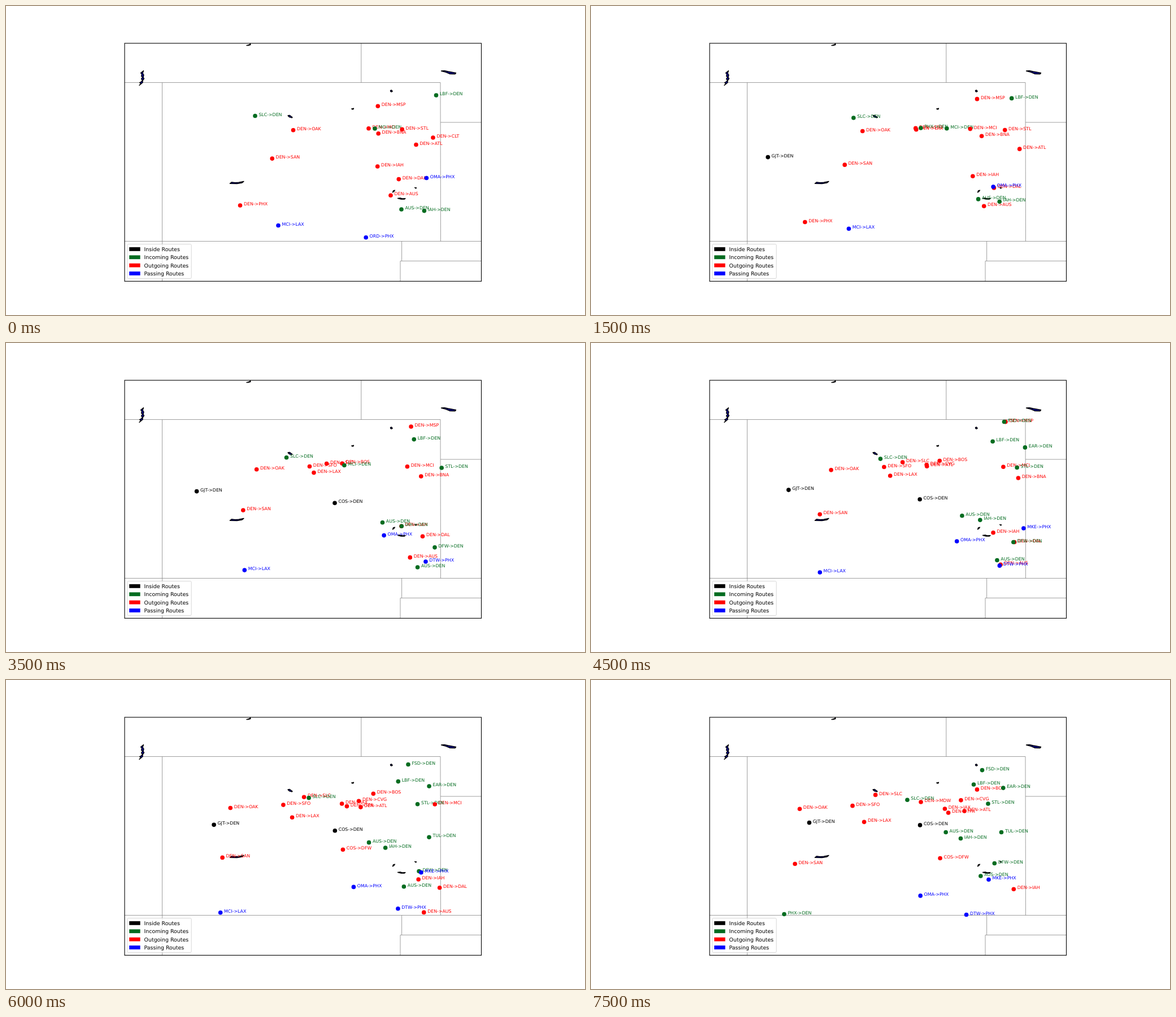
Recreate the animation shown at these times as an HTML page. Size 1025 px wide and 547 px high, loop 8000 ms.

```html
<!DOCTYPE html>
<html lang="en">
<head>
<meta charset="utf-8">
<title>Routes</title>
<style>
  html, body { margin: 0; width: 100%; height: 100%; overflow: hidden; background: #fff; }
  svg { display: block; width: 100%; height: 100%; }
  text { font-family: "DejaVu Sans", sans-serif; text-rendering: geometricPrecision; white-space: pre; }
  #labels { font-size: 7.85px; }
  #legend text { font-size: 9.42px; }
  .borders { fill: none; stroke: #808080; stroke-width: .75; }
  .lakes { fill: #00008b; stroke: #000; stroke-width: 1.3; stroke-linejoin: round; }
</style>
</head>
<body>
<svg viewBox="0 0 1025 547">
  <path class="borders" d="M210 135.5H769L769.5 416.5M276.5 135.5V487M628.8 66V135.5M769.2 206H841.5M210 416.5H841.5M700.6 416.5V451.4M841.5 451.4H698V487"/>
  <g class="lakes">
    <path d="M243.5 114.5L238.5 118.5 240.5 121.500 239.500 124 241.500 126 239.500 129 241.500 131.500 239.500 134 236.500 135.500 238.500 137.500 236 140.500 239 138 242 135.500 242 132 244.500 128.500 243 126 244 122 242 119Z"/>
    <path d="M770.5 115L776 114.300 783 116 791 117.300 796.500 118.500 795 120.500 786 120.300 779 117.300Z"/>
    <path d="M425.8 69.900L429 69.900 433 68.700 432.500 66.500 431 68.300Z"/>
    <path d="M499 194L502 193.300 507 197 506 198 501.500 196.700Z"/>
    <path d="M680.500 149.300L683 148.800 682.700 150 684.300 150.500 683 152 680.800 151.500Z"/>
    <path d="M611.800 182L615.500 181.200 615 182.700 613 183Z"/>
    <path d="M396.300 314.300L399.500 311.800 406 312.700 412 312.200 421 310.400 418 313 409 314.500Z"/>
    <path d="M684.500 330L685.500 327 688.500 326.200 686.800 328.500Z"/>
    <path d="M723.500 321.300L726.700 321.800 725.500 322.900Z"/>
    <path d="M693.500 340.500L698 339.800 702 341 707 340.700 705.500 342 699.500 342Z"/>
  </g>
  <g id="labels"></g>
  <g id="dots"></g>
  <rect x="210" y="66" width="631.5" height="421.300" fill="none" stroke="#000" stroke-width="1.1"/>
  <g id="legend">
    <rect x="214.700" y="421.700" width="113.500" height="60.700" rx="2" fill="#fff" fill-opacity=".8" stroke="#ccc" stroke-width=".8"/>
  </g>
</svg>
<script>
const STEP_MS = 500, STEPS = 16, LAST = STEPS - 1;
const BLACK = '#000', GREEN = '#046c20', RED = '#f00', BLUE = '#00f';

// Each flight: route, first step, last step, x, y at the first step, dx, dy per step.
const outgoing = [
  ['DEN->OAK', 0, LAST, 508.5, 219.8, -9.27, .56],
  ['DEN->SAN', 0, LAST, 471.2, 270.1, -7.34, 3.69],
  ['DEN->PHX', 0, 6, 414.5, 353, -11.9, 9.85],
  ['DEN->MSP', 0, 9, 658.3, 177.2, 8.4, -4.18],
  ['DEN->MCI', 0, 13, 642, 216.8, 9.77, .27],
  ['DEN->BNA', 0, 10, 659.2, 225.8, 10.8, 1.46],
  ['DEN->STL', 0, 6, 701.2, 218.4, 10.5, .4],
  ['DEN->CLT', 0, 1, 756, 233, 11, 1.8],
  ['DEN->ATL', 0, 4, 726, 245.5, 10.9, 2.55],
  ['DEN->IAH', 0, LAST, 657.7, 284, 6.04, 5.75],
  ['DEN->DAL', 0, 12, 695.3, 306.6, 6.03, 5.1],
  ['DEN->AUS', 0, 12, 681, 335.2, 4.9, 6.35],
  ['DEN->SFO', 2, LAST, 584, 215.9, -9.31, .52],
  ['DEN->LAX', 2, LAST, 583.4, 216, -7.68, 2.72],
  ['DEN->SLC', 5, LAST, 583.6, 216, -8, -1.26],
  ['DEN->BOS', 6, LAST, 584, 215.7, 11.05, -2.42],
  ['DEN->ATL', 8, LAST, 583.6, 216, 11.07, 2.28],
  ['DEN->CVG', 8, LAST, 584, 216, 10.13, -.45],
  ['DEN->TPA', 10, LAST, 584, 216, 9.72, 3.8],
  ['COS->DFW', 10, LAST, 582, 290, 7.21, 5.1],
  ['DEN->JAX', 11, LAST, 584, 216, 10.6, 3],
  ['DEN->MDW', 15, LAST, 584, 216, 0, 0]
];
const incoming = [
  ['SLC->DEN', 0, LAST, 441, 194.5, 7.93, 1.18],
  ['LBF->DEN', 0, LAST, 761.5, 158, -5.6, 1.8],
  ['MCI->DEN', 0, 8, 653, 217, -7.73, -.08],
  ['AUS->DEN', 0, LAST, 700, 360, -4.79, -6.03],
  ['IAH->DEN', 0, LAST, 740.4, 362.6, -5.73, -5.47],
  ['PHX->DEN', 3, 3, 583.8, 216, 0, 0],
  ['AUS->DEN', 4, LAST, 743.1, 415.7, -4.84, -6.24],
  ['DFW->DEN', 5, LAST, 770.2, 371.2, -5.59, -4.67],
  ['STL->DEN', 7, LAST, 771.2, 221, -8.53, -.25],
  ['FSD->DEN', 8, LAST, 738, 136.2, -6.5, 3.34],
  ['EAR->DEN', 9, LAST, 768.4, 184.9, -6.44, 1.03],
  ['TUL->DEN', 10, LAST, 764, 284, -7.5, -2.9],
  ['PHX->DEN', 15, LAST, 342, 414.5, 0, 0]
];
const inside = [
  ['GJT->DEN', 3, LAST, 313.2, 267.6, 6.1, -1.25],
  ['COS->DEN', 5, LAST, 581.9, 289.9, .06, -3.3]
];
const passing = [
  ['OMA->PHX', 0, LAST, 744.4, 304.5, -10.75, 5.16],
  ['MCI->LAX', 0, 14, 482, 388.5, -8.53, 1.94],
  ['ORD->PHX', 0, 1, 637.2, 409.8, -10.3, 5],
  ['DTW->PHX', 5, LAST, 762.6, 379.9, -9.81, 3.56],
  ['MKE->PHX', 9, LAST, 765.8, 328, -10.3, 4.22]
];

const byId = id => document.getElementById(id);
function add(parent, tag, attrs, content = '') {
  const node = document.createElementNS('http://www.w3.org/2000/svg', tag);
  for (const key in attrs) node.setAttribute(key, attrs[key]);
  node.textContent = content;
  return parent.appendChild(node);
}

const flights = [[outgoing, RED], [incoming, GREEN], [inside, BLACK], [passing, BLUE]]
  .flatMap(([list, fill]) => list.map(([route, first, last, x, y, dx, dy]) => ({
    first, last, x, y, dx, dy,
    nodes: [
      add(byId('labels'), 'text', { x: 6.4, y: .1, fill }, route),
      add(byId('dots'), 'circle', { r: 3.8, fill })
    ]
  })));

[['Inside', BLACK], ['Incoming', GREEN], ['Outgoing', RED], ['Passing', BLUE]].forEach(([name, fill], i) => {
  const y = 427 + i * 14.35;
  add(byId('legend'), 'rect', { x: 218.2, y, width: 19.4, height: 6.8, fill });
  add(byId('legend'), 'text', { x: 244.6, y: y + 6.8 }, name + ' Routes');
});

let shown = -1;
function draw(now) {
  const step = Math.floor(now / STEP_MS) % STEPS;
  if (step !== shown) {
    shown = step;
    for (const f of flights) {
      const n = step - f.first;
      const visible = n >= 0 && step <= f.last;
      for (const node of f.nodes) {
        node.setAttribute('visibility', visible ? 'visible' : 'hidden');
        node.setAttribute('transform', `translate(${f.x + f.dx * n} ${f.y + f.dy * n})`);
      }
    }
  }
}
const start = performance.now();
function tick() {
  draw(performance.now() - start);
  requestAnimationFrame(tick);
}
tick();
</script>
</body>
</html>
```
